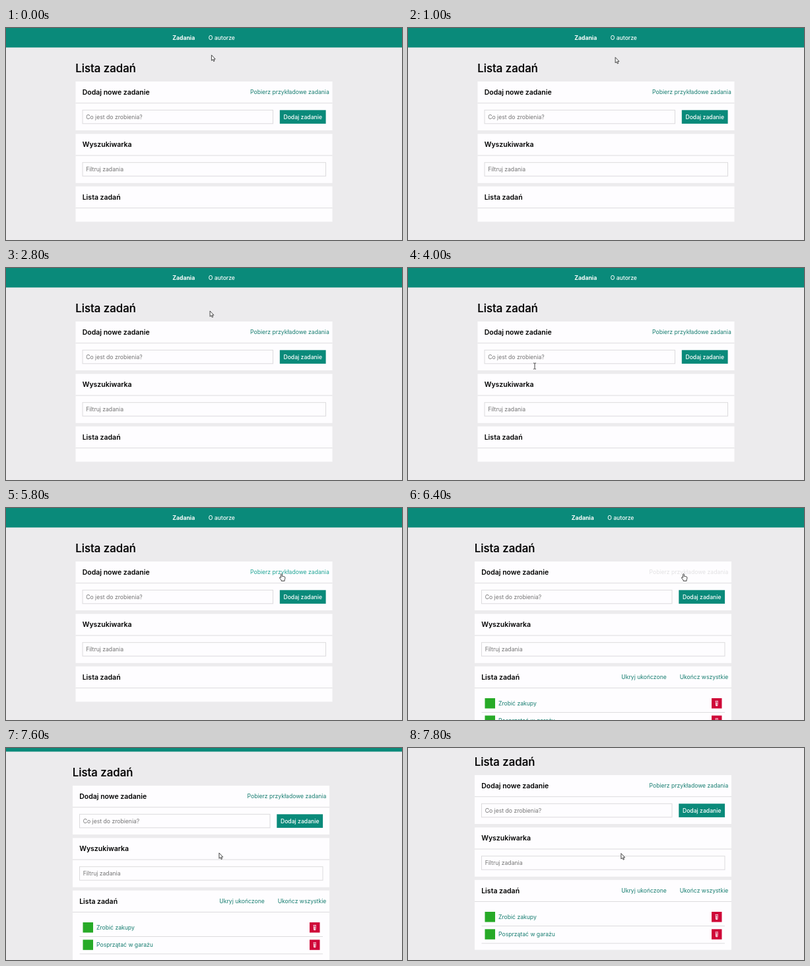
Animation, 600 px wide and 321 px high, one loop 8000 ms. Source, as an HTML page:

```html
<!DOCTYPE html>
<html lang="pl">
<head>
<meta charset="utf-8">
<title>Lista zadań</title>
<style>
  html, body { margin: 0; width: 100%; height: 100%; overflow: hidden; background: #ecebed; }
  svg { display: block; width: 600px; height: 321px; font: 8.65px Inter, "Open Sans", sans-serif; }
  .bar { fill: #0a8a7a; }
  .panel { fill: #fefdff; }
  .line { fill: #dddcde; }
  .input { fill: #fefdff; stroke: #dcdbdd; }
  .h1 { font-size: 16.8px; font-weight: 500; stroke: #000; stroke-width: .2px; }
  .h2 { font-size: 10.5px; font-weight: 600; }
  .hint { fill: #747474; }
  .link { fill: #167d70; }
  .light { fill: #fff; font-weight: 500; }
  .strong { fill: #fff; font-weight: 700; }
  .done { fill: #27aa27; }
  .remove { fill: #cf0638; }
  .cursor { fill: #fff; stroke: #333; stroke-width: .9; stroke-linejoin: round; }
  .beam { fill: none; stroke: #444; stroke-width: 1; }
</style>
</head>
<body>
<svg id="stage" viewBox="0 0 600 321">
  <g id="page"></g>
  <g id="cursor">
    <path id="arrow" class="cursor" d="M.4 .4V8.8L2.3 7.1 3.6 10 5 9.4 3.7 6.6H6.2Z"/>
    <path id="beam" class="beam" d="M-2-4.5H-.5L0-4 .5-4.5H2M0-4V4M-2 4.5H-.5L0 4 .5 4.5H2"/>
    <path id="hand" class="cursor" d="M-.9 6V.7Q0-.5 .9 .7V4L2.2 3.9 3.5 4.3 4.8 4.7Q5.6 5 5.4 7L4.6 9.3V11H-.4V9.6L-3 6.5Q-3.2 5-1.8 5.2Z"/>
  </g>
</svg>
<script>
const LOOP = 8000, STEP = 200;
const $ = id => document.getElementById(id);

const rect = (cls, x, y, w, h) =>
  `<rect class="${cls}" x="${x}" y="${y}" width="${w}" height="${h}"/>`;
const text = (cls, x, y, str, extra = "") =>
  `<text class="${cls}" x="${x}" y="${y}" ${extra}>${str}</text>`;
const panel = (y, h, title) =>
  rect("panel", 105.5, y, 389, h) + rect("line", 105.5, y + 32.2, 389, 1) +
  text("h2", 115.7, y + 20, title);
const input = (y, w, hint) =>
  rect("input", 116, y, w, 20.5) + text("hint", 121.2, y + 13.2, hint);
const end = 'text-anchor="end"';

const task = (y, name) =>
  rect("done", 121, y, 15.5, 15.5) + text("link", 141.5, y + 10.8, name) +
  rect("remove", 464.5, y, 15.5, 15.5) +
  `<path d="M470 ${y + 4.5}h4.5M470.7 ${y + 5.5}l.4 6h2.3l.4-6M472.2 ${y + 6}v5"
    fill="none" stroke="#fff" stroke-width=".9"/>` +
  rect("line", 116, y + 21, 368.5, 1);

$("page").innerHTML =
  `<rect class="bar" x="-10" width="620" height="29.5"/>` +
  text("strong", 252.3, 17.7, "Zadania") + text("light", 306.8, 17.7, "O autorze") +
  text("h1", 105.3, 66.6, "Lista zadań") +
  panel(81, 74, "Dodaj nowe zadanie") +
  text("link", 489.8, 100, "Pobierz przykładowe zadania", `${end} id="fetch"`) +
  input(124.3, 288.5, "Co jest do zrobienia?") +
  rect("bar", 414.8, 124.3, 69.8, 20.6) +
  text("light", 449.7, 137.5, "Dodaj zadanie", 'text-anchor="middle"') +
  panel(160.3, 74.5, "Wyszukiwarka") + input(203.7, 368.5, "Filtruj zadania") +
  `<g id="empty">${panel(239.8, 53.5, "Lista zadań")}</g>` +
  `<g id="full">${panel(239.8, 105.8, "Lista zadań") +
    text("link", 396.3, 258.5, "Ukryj ukończone", end) +
    text("link", 489.8, 258.5, "Ukończ wszystkie", end) +
    task(288, "Zrobić zakupy") + task(314.3, "Posprzątać w garażu")}</g>`;

// [time, x, y] of the pointer
const path = [
  [0, 311, 40.5], [600, 311, 40.5], [1800, 321.5, 54], [2600, 318, 58],
  [3800, 192, 148.5], [4600, 192, 148.5], [5600, 417.5, 99.5],
  [6600, 417.5, 99.5], [7200, 322.5, 157.5], [8000, 322.5, 159.5]
];

function pointerAt(t) {
  const i = path.findIndex(p => p[0] > t);
  const [t0, x0, y0] = path[i - 1], [t1, x1, y1] = path[i];
  const k = (t - t0) / (t1 - t0), e = k * k * (3 - 2 * k);
  return [x0 + (x1 - x0) * e, y0 + (y1 - y0) * e];
}

function linkColor(t) {
  if (t >= 6000 && t < 6600) return "#e2e1e3";
  return t >= 5400 && t < 6000 ? "#20a596" : "";
}

function draw(t) {
  const loaded = t >= 6400;
  const scroll = t >= 7800 ? 40 : t >= 7600 ? 24 : 0;
  $("page").setAttribute("transform", `translate(${loaded ? -4.5 : 0} ${-scroll})`);
  $("empty").style.display = loaded ? "none" : "";
  $("full").style.display = loaded ? "" : "none";
  $("fetch").style.fill = linkColor(t);

  const [x, y] = pointerAt(t);
  const shape = x > 368 && y < 104 ? "hand" : x < 405 && y > 124 && y < 149 ? "beam" : "arrow";
  for (const id of ["arrow", "beam", "hand"]) $(id).style.display = id === shape ? "" : "none";
  $("cursor").setAttribute("transform", `translate(${x} ${y})`);
}

const start = performance.now();
function tick() {
  const t = (performance.now() - start) % LOOP;
  draw(Math.floor(t / STEP) * STEP);
  requestAnimationFrame(tick);
}
tick();
</script>
</body>
</html>
```
